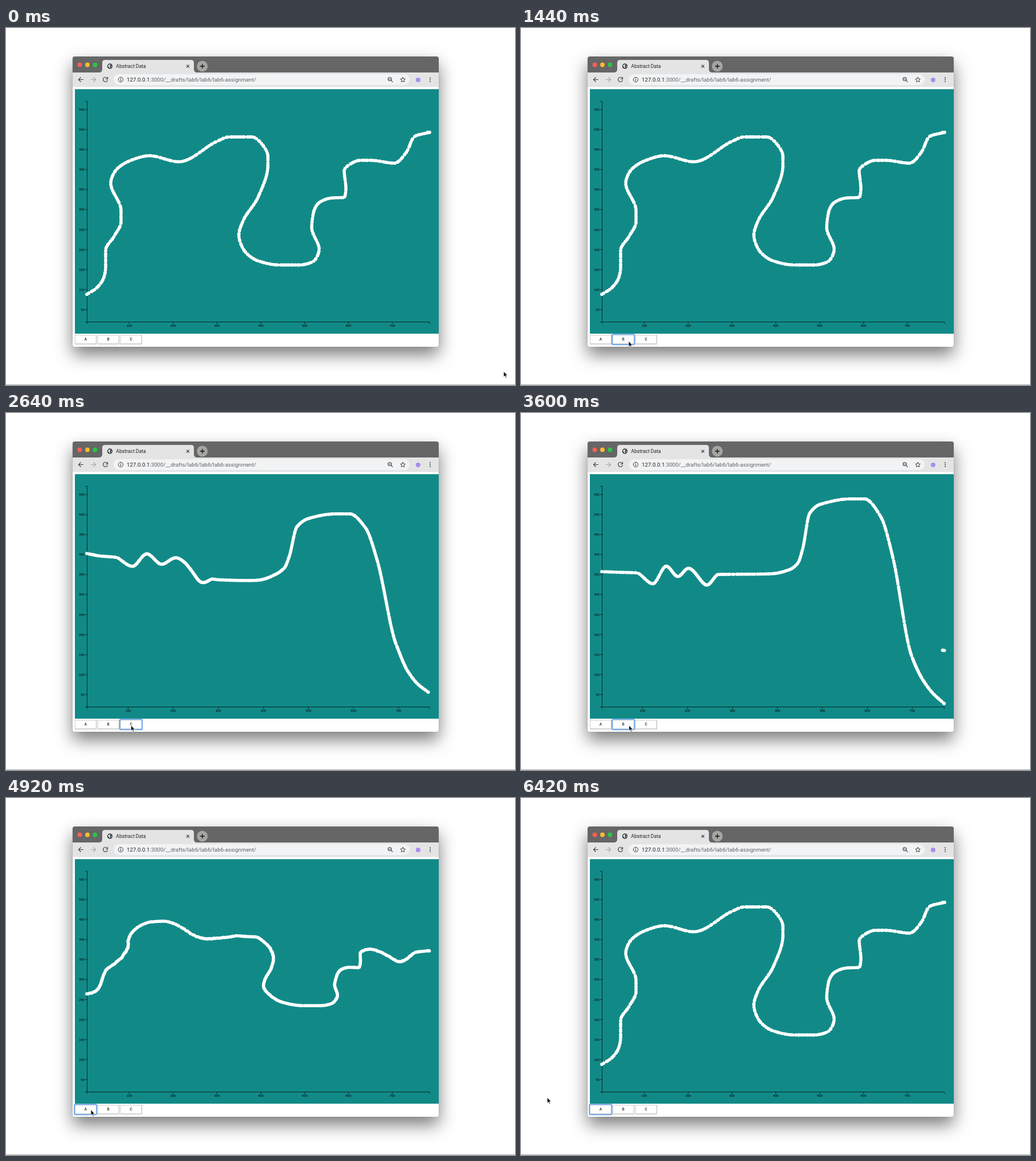
An HTML page that plays this animation: 894 by 626 pixels, repeating every 6480 ms.

```html
<!DOCTYPE html>
<html lang="en">
<head>
<meta charset="utf-8">
<title>Abstract Data</title>
<style>
  html, body { margin: 0; width: 100%; height: 100%; overflow: hidden; background: #fff; }
  svg { position: absolute; left: 0; top: 0; }
  #window {
    position: absolute; left: 117px; top: 50px; width: 643px; height: 509px;
    border-radius: 4px 4px 3px 3px; background: #fff;
    box-shadow: 0 14px 30px rgba(0,0,0,.52), 0 0 1px rgba(0,0,0,.5);
  }
  text { font-family: Roboto, Inter, sans-serif; }
  .small text { font-family: "Liberation Sans", Arial, sans-serif; font-size: 5.7px; fill: #000; }
  #buttons text { font-family: Inter, sans-serif; font-size: 6px; font-weight: 500; text-anchor: middle; }
  .icon { fill: none; stroke: #3c4043; stroke-width: 1.2; }
</style>
</head>
<body>
<div id="window"></div>
<svg width="894" height="626" viewBox="0 0 894 626">
  <path d="M0 625.5H894" stroke="#aaa"/>

  <!-- browser chrome -->
  <path d="M117 78V54Q117 50 121 50H756Q760 50 760 54V78Z" fill="#666"/>
  <path d="M117 78H760V103.4H117Z" fill="#e4e4e4"/>
  <path d="M163 78Q169 78 169 72V61Q169 56 174 56H325Q330 56 330 61V72Q330 78 336 78Z" fill="#e4e4e4"/>
  <circle cx="129.5" cy="64.5" r="3.9" fill="#ff5f57"/>
  <circle cx="143" cy="64.5" r="3.9" fill="#febc2e"/>
  <circle cx="156.4" cy="64.5" r="3.9" fill="#28c840"/>
  <circle cx="182.5" cy="67" r="4.7" fill="#3c4043"/>
  <path d="M179 66L181 64 184 64.5 182 67 183.5 69 182 70.5ZM184.5 67L186.3 66.5 185.5 69.5Z" fill="#e4e4e4"/>
  <text x="193.3" y="70" font-size="8.6" fill="#222">Abstract Data</text>
  <path class="icon" d="M317 64.7L321.8 69.5M321.8 64.7L317 69.5"/>
  <circle cx="344.8" cy="67" r="9.5" fill="#a3a6a1"/>
  <path d="M340.8 67H348.8M344.8 63V71" stroke="#111" stroke-width="1.3"/>
  <path class="icon" d="M136 90.5H127.5M131.5 86.5L127.5 90.5 131.5 94.5"/>
  <path class="icon" style="stroke:#a5a5a5" d="M149 90.5H157.5M153.5 86.5L157.5 90.5 153.5 94.5"/>
  <path class="icon" d="M177.6 87.6A4 4 0 1 0 178.4 91.5M178.5 86V89.3H175.2"/>
  <rect x="189" y="81" width="520" height="19" rx="9.5" fill="#f1f3f4"/>
  <circle class="icon" style="stroke-width:1" cx="201.5" cy="90.5" r="4.2"/>
  <path class="icon" d="M201.5 89.8V93M201.5 87.6V88.7"/>
  <text x="212" y="94" font-size="9.7" fill="#5f6368"><tspan fill="#202124">127.0.0.1</tspan>:3000/__drafts/lab6/lab6/lab6-assignment/</text>
  <circle class="icon" style="stroke-width:1.1" cx="674" cy="89.5" r="3"/>
  <path class="icon" d="M676.2 91.7L679.3 94.8M672.5 89.5H675.5" style="stroke-width:1.1"/>
  <path class="icon" style="stroke-width:1" d="M697 86.2L698.2 89.1 701.3 89.4 699 91.5 699.7 94.6 697 93 694.3 94.6 695 91.5 692.7 89.4 695.8 89.1Z"/>
  <circle cx="723.8" cy="91" r="4" fill="#aa8cf0"/>
  <path d="M745 87.2h0M745 90.5h0M745 93.8h0" stroke="#3c4043" stroke-width="2" stroke-linecap="round"/>

  <!-- page -->
  <path d="M121 107.3H760V536H121Z" fill="#118a87"/>
  <g id="buttons" class="small"></g>
  <rect id="focus" y="537.3" width="39.4" height="17.9" rx="1.2" fill="none" stroke="#70a8ec" stroke-width="1.9"/>
  <g class="small">
    <path id="axes" fill="none" stroke="#06201f" stroke-width=".9"/>
    <g id="yLabels" text-anchor="end"></g>
    <g id="xLabels" text-anchor="middle"></g>
  </g>
  <path id="dots" fill="none" stroke="#fff" stroke-width="5.8" stroke-linecap="round"/>
  <path id="cursor" d="M0 0V10L2.3 8 3.9 11.7 5.5 11 3.9 7.4H7Z" fill="#111" stroke="#fff" stroke-width=".8"/>
</svg>
<script>
const LOOP = 6480, STEP = 60, MOVE = 400, COUNT = 340;
const LEFT = 142, RIGHT = 743.5;
const $ = id => document.getElementById(id);
const mix = (p, q, u) => p + (q - p) * u;
const parse = text => text.trim().split(/\s+/).map(p => p.split(',').map(Number));

// Smooth function through [input, output] knots that bends back only at knots.
function through(knots) {
  const slope = knots.slice(1).map((k, i) => (k[1] - knots[i][1]) / (k[0] - knots[i][0]));
  const tangent = knots.map((_, i) => {
    const l = slope[i - 1] ?? slope[i], r = slope[i] ?? l;
    return l * r > 0 ? 2 * l * r / (l + r) : 0;
  });
  return x => {
    let i = 0;
    while (i < knots.length - 2 && knots[i + 1][0] < x) i++;
    const [x0, y0] = knots[i], [x1, y1] = knots[i + 1], h = x1 - x0, u = (x - x0) / h;
    return mix(y0, y1, u * u * (3 - 2 * u)) + h * u * (1 - u) * (tangent[i] * (1 - u) - tangent[i + 1] * u);
  };
}

// Turning points of the winding curve.
const bends = parse(`142,467 160,455 172,437 175,420 175,390 190,365 202,340 202,320 184,272 191,252
  217,233 252,224 303,234.5 372,198 392,191 432,191 449,203 460,225 460,241 443,296 416,339 409,363
  417,388 442,408 480,415.5 515,415.5 540,409 550,388 537,350 540,324 549,307 572,298 594,297 597,282
  594,250 604,239 622,232 640,232 682,237 703,218 718,190 744,183`);
let length = 0;
const along = bends.map((p, i) => i ? length += Math.hypot(p[0] - bends[i - 1][0], p[1] - bends[i - 1][1]) : 0);
const [windX, windY] = [0, 1].map(d => through(bends.map((p, i) => [along[i], p[d]])));

const slide = through(parse(`142,128 148,146 165,154 188,155 212,161 235,173 265,185 315,185 345,196
  372,225 398,274 432,328 455,336 492,306 518,290 574,274.5 627,274.5 660,294 682,330 702,391 723,413 744,416.5`));
const ridge = through(parse(`142,286 205,287 234,307 257,274 276,292 293,277 322,303 343,281 440,279
  470,273 485,262 494,235 506,170 524,154 579,144 603,144 632,177 653,250 686,430 718,489 744,515`));
// Where a dot on the ridge sits on the slide.
const slideX = through(parse(`142,142 190,151 212,160 234,187 257,224 285,290 322,398 343,425
  440,462 494,510 524,550 600,603 744,737`));

let seed = 7;
const random = () => (seed = seed * 16807 % 2147483647) / 2147483647;

// COUNT slightly uneven places, walked at an even pace along the path.
function spread(path, end) {
  const steps = 2000, total = [0];
  let last = path(0);
  for (let i = 1; i <= steps; i++) {
    const p = path(end * i / steps);
    total.push(total[i - 1] + Math.hypot(...p.map((v, d) => v - last[d])));
    last = p;
  }
  let k = 0;
  return Array.from({ length: COUNT }, (_, i) => {
    const share = Math.min(1, (i + (i ? random() * .6 : 0)) / (COUNT - 1));
    while (total[k] < share * total[steps]) k++;
    return path(end * k / steps);
  });
}

const a = spread(s => [windX(s), windY(s)], length);
const pairs = spread(s => {
  const x = LEFT + s, bx = slideX(x);
  return [bx, slide(bx), x, ridge(x)];
}, RIGHT - LEFT);
const b = pairs.map(p => p.slice(0, 2)), c = pairs.map(p => p.slice(2));
for (const x of [RIGHT - 3, RIGHT]) {
  a.push([x, windY(length)]);
  b.push([x, slide(x)]);
}
const shapes = { a, b, c };

// Pixel position of 100 and pixels per 100 on the x axis.
const scales = { a: [216.6, 77], b: [213.6, 78.95], c: [214.6, 79.15] };
const label = (x, y, s) => `<text x="${x}" y="${y}">${s}</text>`;
let yTicks = '';
for (let v = 50; v <= 550; v += 50) {
  const y = 528.9 - v * .7016;
  yTicks += `M142.5 ${y}h-3.5`;
  $('yLabels').innerHTML += label(137.8, y + 2, v);
}
function drawAxes(name) {
  const [x0, step] = scales[name];
  let d = 'M139 128.5H142.5V515.5H139M142.5 518.5V515.5H743.7V518.5' + yTicks, text = '';
  for (let i = 0; i < 7; i++) {
    const x = x0 + i * step;
    d += `M${x} 515.5v3.5`;
    text += label(x, 523.6, (i + 1) * 100);
  }
  $('axes').setAttribute('d', d);
  $('xLabels').innerHTML = text;
}

const buttonX = name => 121 + 39.9 * 'abc'.indexOf(name);
for (const name of 'abc') {
  const x = buttonX(name);
  $('buttons').innerHTML += `<rect x="${x + .4}" y="538.4" width="37" height="15.4" fill="#fff" stroke="#c8c8c8" stroke-width=".9"/>
    <path d="M${x} 554.2h37.8v-15.5" fill="none" stroke="#aaa" stroke-width=".6"/>`
    + label(x + 18.9, 548.2, name.toUpperCase());
}

// Focus time, start of the change, from, to.
const clicks = [[1380, 1470, 'a', 'b'], [2340, 2399, 'b', 'c'], [3440, 3507, 'c', 'b'], [4680, 4700, 'b', 'a']];
// Cursor moves: start, end, goal.
const moves = [
  [480, 1320, 189, 549], [1860, 2280, 219.5, 547.5], [2820, 3360, 189.5, 547.5],
  [3960, 4380, 149, 546.5], [5960, 6420, 46, 525]
];
const easeInOut = u => u < .5 ? 4 * u ** 3 : 1 - 4 * (1 - u) ** 3;
const easeOut = u => 1 - (1 - u) ** 2;

let axisName;
function draw(now) {
  const t = Math.floor(now % LOOP / STEP) * STEP;

  const focused = clicks.filter(k => k[0] <= t).pop();
  $('focus').style.display = focused ? '' : 'none';
  if (focused) $('focus').setAttribute('x', buttonX(focused[3]) - .9);

  const [, start, from, to] = clicks.filter(k => k[1] <= t).pop() || [0, -MOVE, 'a', 'a'];
  const e = easeInOut(Math.min(1, (t - start) / MOVE));
  $('dots').setAttribute('d', shapes[to].map((p, i) => {
    const q = shapes[from][i] || p;
    return `M${mix(q[0], p[0], e).toFixed(2)} ${mix(q[1], p[1], e).toFixed(2)}h0`;
  }).join(''));
  if (axisName !== to) drawAxes(axisName = to);

  let x = 874, y = 602;
  for (const [t0, t1, goalX, goalY] of moves) {
    const u = easeOut(Math.max(0, Math.min(1, (t - t0) / (t1 - t0))));
    x = mix(x, goalX, u);
    y = mix(y, goalY, u);
  }
  $('cursor').setAttribute('transform', `translate(${x} ${y})`);
}

const begin = performance.now();
(function tick() {
  draw(performance.now() - begin);
  requestAnimationFrame(tick);
})();
</script>
</body>
</html>
```
